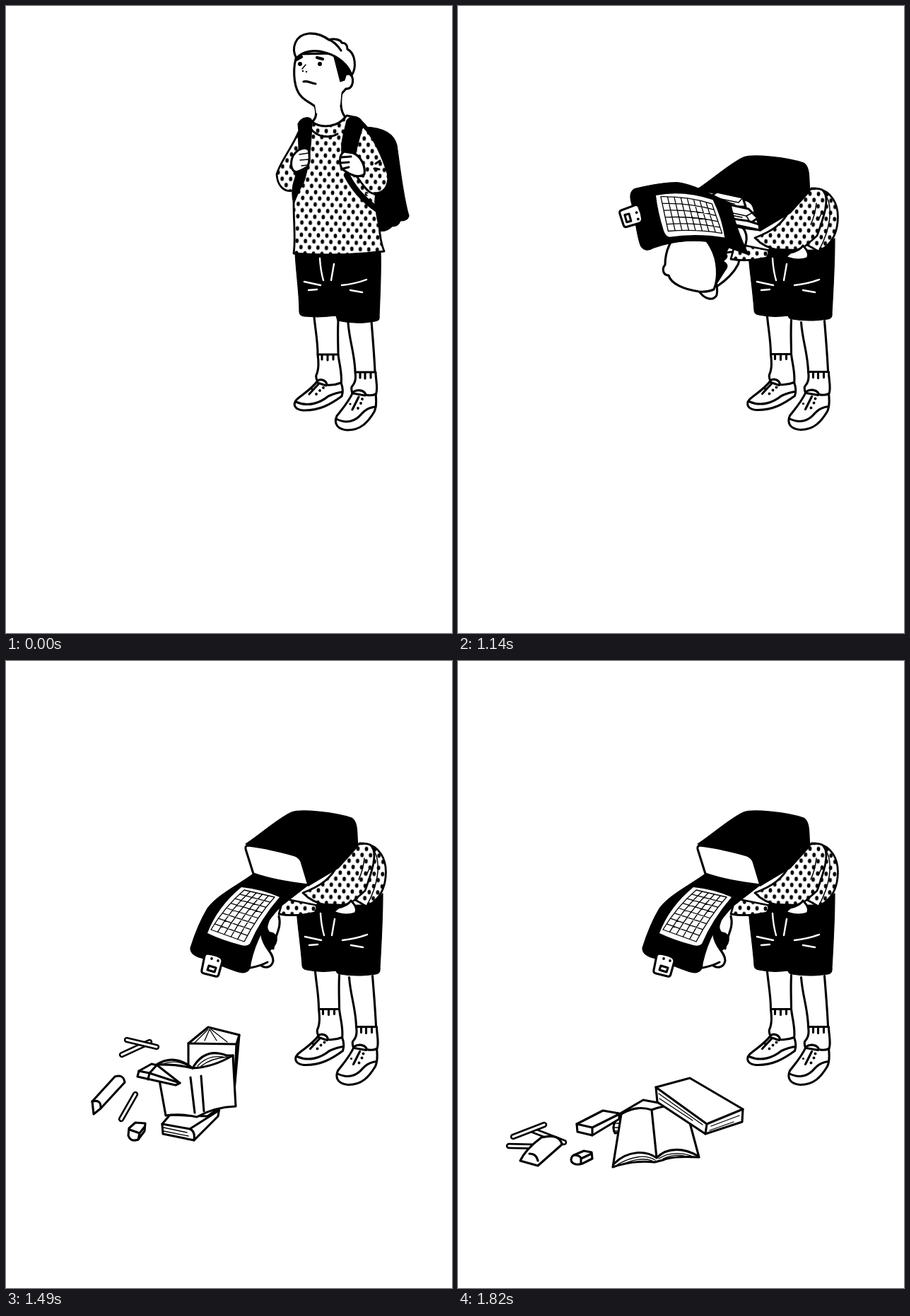
Animation of 631 by 887 pixels, one loop 3.82 s. Source, as an HTML page:

```html
<!DOCTYPE html>
<html lang="en">
<head>
<meta charset="utf-8">
<title>Emptied backpack</title>
<style>
html, body { margin: 0; width: 100%; height: 100%; overflow: hidden; background: #fff; }
svg { display: block; width: 100%; height: 100%; }
path { stroke: #000; stroke-width: 3.1; stroke-linecap: round; stroke-linejoin: round; fill: none; }
.w { fill: #fff; }
.k { fill: #000; stroke-width: 1.2; }
.s { fill: url(#dots); stroke-width: 2.8; }
.b { fill: #fff; stroke: none; }
.t { stroke-width: 1.5; }
.n { stroke-width: 1.3; }
.v { stroke: #fff; stroke-width: 2.4; }
.m { stroke-width: 4.2; }
.h { stroke-width: 8.5; }
.o { stroke-width: 8.4; }
.i { stroke: #fff; stroke-width: 3.2; }
</style>
</head>
<body>
<svg id="stage" viewBox="0 0 631 887" xmlns="http://www.w3.org/2000/svg"></svg>
<script>
const p = (cls, d) => `<path class="${cls}" d="${d}"/>`;
const dot = (x, y, r = 1.9) => `<circle cx="${x}" cy="${y}" r="${r}"/>`;
const group = (transform, body) => `<g transform="${transform}">${body}</g>`;
const pen = (x1, y1, x2, y2) => p('o', `M${x1},${y1}L${x2},${y2}`) + p('i', `M${x1},${y1}L${x2},${y2}`);
const item = (x, y, body) => ({ x, y, body });
const draw = items => items.map(i => i.body).join('');

// Items pulled towards a point (k = 1 leaves them in place) and turned by a.
const gather = (items, px, py, k, a) => items.map((it, n) =>
  group(`translate(${(1 - k) * (px - it.x)} ${(1 - k) * (py - it.y)}) rotate(${n % 2 ? a : -a} ${it.x} ${it.y})`, it.body)).join('');

const defs = `<defs><pattern id="dots" width="12" height="17.4" patternUnits="userSpaceOnUse" patternTransform="rotate(2)">
<rect width="12" height="17.4" fill="#fff"/><ellipse cx="3" cy="4.35" rx="2.4" ry="3.2"/><ellipse cx="9" cy="13.05" rx="2.4" ry="3.2"/>
</pattern></defs>`;

const legs =
  p('l', 'M436,440C438,460 441,475 441,492M470,445C469,465 470,480 470,492M484,448C486,475 493,490 494,517M517,446C519,470 521,495 522,517') +
  p('w', 'M441,493C443,508 442,516 439,522Q438,527 441,531L453,540L474,535C476,520 472,510 470,493Z') +
  p('l', 'M447,494V500M455,494V501M463,494V500') +
  p('w', 'M441,530C432,543 418,550 411,557C405,564 409,571 420,572C443,573 460,563 475,552Q478,543 474,533Q464,537 454,536C453,529 445,527 441,530Z') +
  p('l', 'M410,560C428,568 445,561 456,552Q467,547 476,546M441,533L453,537M429,549L442,535') +
  dot(439, 549) + dot(444, 544) + dot(449, 540) + dot(433, 542, 1.6) +
  p('w', 'M494,518C496,531 492,535 489,539Q488,544 491,550L505,554L523,550C527,542 523,530 523,518Z') +
  p('l', 'M501,519V526M508,519V527M516,519V526') +
  p('w', 'M491,546C485,560 475,571 468,580C463,592 470,599 483,600C502,600 512,589 521,574Q525,565 523,549Q517,552 509,550C507,543 497,542 491,546Z') +
  p('l', 'M467,584C482,592 495,587 503,577Q511,568 523,567M491,548L508,551M490,571L499,553') +
  dot(498, 569) + dot(502, 562) + dot(504, 556) + dot(487, 563, 1.6);
const movedLegs = group('translate(1.5 -.5)', legs);

const creases = p('v', 'M444,357Q445,374 449,388M464,365L460,388M475,395Q494,393 510,387M487,402L504,405M422,390L445,395M428,402L440,401');

const shorts =
  p('k', 'M409,347L530,347C531,380 529,410 528,439Q529,445 522,446Q495,451 469,445L467,438Q445,441 422,439Q415,438 415,432C415,405 410,375 409,347Z') + creases;

const bentShorts =
  p('k', 'M411,350L440,346L515,345L533,329C533,365 531,400 529,434Q530,442 523,443Q495,447 473,443Q468,443 467,438Q445,441 426,437Q419,436 419,430C417,400 413,380 411,350Z') +
  group('translate(1 0)', creases);

const standing = legs +
  p('k', 'M508,171C533,172 549,180 553,197C558,232 562,270 570,297Q568,304 558,304Q555,312 546,312Q538,320 528,318L508,270Z') +
  shorts +
  p('s', 'M424,166L434,163C448,173 470,171 482,155C501,157 512,171 515,181C520,230 520,280 528,310Q529,332 535,347Q472,355 407,350C410,330 407,310 407,278L416,230Z') +
  p('w', 'M436,138C440,150 440,158 433,164C447,174 470,171 480,157Q470,146 476,116Z') +
  p('l', 'M430,172C440,187 459,187 469,181') +
  p('s', 'M414,178C405,200 388,220 383,238C384,256 395,264 407,261L416,228Z') +
  p('k', 'M413,167C418,156 432,155 433,163C432,195 429,228 421,250Q414,262 407,280Q402,262 409,243C415,220 417,195 413,167Z') +
  p('w', 'M424,201Q413,201 406,212C401,224 404,234 411,235Q420,232 427,227Q431,216 428,203Z') +
  p('t', 'M415,210L428,208M416,218L428,217M418,226L427,225') +
  p('s', 'M503,168C520,184 534,215 541,240C541,260 531,266 518,265C509,262 504,250 495,240L494,208Z') +
  p('l', 'M523,223L529,219M521,230L528,231') +
  p('h', 'M482,239Q497,269 527,289') + p('b', 'M509,265L522,268L521,277Z') +
  p('k', 'M482,162C490,151 503,157 506,168C500,184 498,198 492,213L476,214C472,196 478,180 482,162Z') +
  p('w', 'M478,206C470,212 471,229 479,233C487,239 499,244 507,238C509,225 501,212 491,208Z') +
  p('l', 'M474,214L488,213M473,222L485,221M477,230L485,228') +
  p('w', 'M412,68C405,87 407,111 414,123C420,134 431,136 438,143L474,125L481,117C492,119 494,98 485,96L465,67Z') +
  p('b', 'M436,133L475,118L473,140L439,152Z') +
  p('k', 'M463,68L473,107L479,105L481,98L490,95Q482,73 463,68Z') +
  p('w', 'M411,74C403,60 409,41 428,39Q444,38 457,48C464,45 474,48 475,52Q483,52 483,61C495,67 496,88 489,98C484,83 470,71 452,66C436,61 419,64 411,74Z') +
  p('l', 'M456,47Q466,51 474,63') +
  dot(416, 82, 3) + dot(444, 82, 3) +
  p('m', 'M411,76L418,72M440,73L448,75') +
  p('t', 'M424,83L419,89') + dot(420, 92, 1.2) + dot(425, 93, 1.2) +
  p('l', 'M421,107C428,105 432,110 438,110');

const bending = movedLegs +
  p('k', 'M478,182C506,185 530,190 546,201C566,213 600,228 615,240Q617,248 603,247L556,245C561,262 567,273 566,284Q562,295 552,296Q548,313 534,313C520,308 504,290 487,272Z') +
  group('translate(1.5 0)', shorts) +
  p('s', 'M381,274C378,288 389,296 404,293L401,273Z') +
  p('s', 'M398,207L438,165Q458,167 480,185L518,278C533,300 527,325 536,346Q471,355 408,349C414,330 411,308 407,290C395,265 393,235 398,207Z') +
  p('k', 'M385,205L398,204Q393,220 393,248L382,248Z') +
  p('w', 'M379,249C374,263 380,275 392,276Q403,266 401,253Q393,240 384,243Z') +
  p('t', 'M383,257L394,248M383,265L397,257M387,272L398,265') +
  p('s', 'M480,182C505,190 536,220 549,245C551,265 534,278 509,278L482,267L487,250L467,235Z') +
  p('l', 'M512,236L521,230M513,244L526,236') +
  p('h', 'M473,263Q497,274 521,297') +
  p('k', 'M456,180C462,172 476,174 481,182Q467,205 467,237L450,235Q448,203 456,180Z') +
  p('w', 'M450,229C441,235 442,251 448,257Q464,264 482,263L487,248L468,236Q460,228 450,229Z') +
  p('w', 'M350,164C354,186 365,200 377,204Q387,207 398,200C420,206 440,197 442,178Q436,166 427,163C430,151 430,140 420,139Z') +
  p('l', 'M400,205C407,217 424,218 435,212') +
  p('k', 'M394,150L402,142L421,140L416,149L412,160Z') +
  p('l', 'M416,148Q417,157 421,161') +
  p('w', 'M343,137C339,114 357,98 386,97C388,90 399,92 400,99C416,104 425,121 422,141C407,142 397,149 385,155C370,164 350,166 338,163C329,157 332,144 343,137Z') +
  dot(382, 170, 2.8) + dot(356, 171, 2.2) +
  p('m', 'M374,162L382,161M351,167L356,168') +
  p('t', 'M366,179L367,186') + dot(371, 183, 1.2) + dot(372, 188, 1.2) +
  p('l', 'M373,194Q381,189 388,193');

const bentHead =
  p('w', 'M376,305C400,300 412,320 407,337Q404,347 395,352L370,350Z') +
  p('w', 'M380,349C394,345 401,355 396,366Q388,382 366,397L358,360Z') +
  p('k', 'M318,316C336,302 362,304 380,312C389,325 385,342 378,350Q385,354 375,361Q385,366 378,374L366,393L350,340Z') +
  p('w', 'M340,402C348,415 361,418 366,409Q368,400 364,388Z') +
  p('w', 'M318,316C300,328 293,348 293,366C288,372 290,381 298,381C301,393 320,401 341,404Q353,405 362,401C369,385 368,360 358,342C350,326 336,316 318,316Z');

const bent = movedLegs + bentShorts +
  p('s', 'M347,301C348,281 358,268 369,265L386,285L362,306Z') +
  p('s', 'M383,288L408,282L540,308C541,330 530,342 511,350L410,349C416,328 409,309 386,302Z') +
  bentHead +
  p('k', 'M378,130C379,114 394,112 410,116C432,123 452,123 463,130C472,140 470,170 468,201C491,198 520,205 536,213C545,218 542,228 542,237Q544,257 540,276L475,303L450,297C420,285 381,285 366,262C365,235 372,190 375,170Z') +
  p('w t', 'M459,245Q467,239 473,250V288Q465,295 457,288Q451,265 459,245Z') +
  p('t', 'M457,250L467,248M461,255L472,254M456,261L466,260M459,267H472M456,273L467,272M457,279L471,280M459,285L467,286') +
  p('s', 'M430,290Q457,303 478,290C496,279 504,266 524,266C546,271 546,304 533,325Q524,342 512,348L488,338L467,349Q443,343 430,314Z') +
  p('l', 'M529,285Q524,306 507,322M519,308L510,326') +
  p('h', 'M383,285L360,307M421,290C427,316 448,340 474,350') +
  p('w', 'M467,350Q474,362 490,362Q504,358 513,347L494,338Q487,347 467,350Z') +
  p('w', 'M414,106Q423,103 432,109Q434,121 430,133Q421,135 411,130Z') +
  p('t', 'M417,110L426,112Q428,116 425,117L416,115Q414,111 417,110Z') + dot(417, 126) + dot(427, 127);

// Mesh pocket: both long edges are curves, rows and columns run between them.
const quad = (a, b, c, t) => a * (1 - t) ** 2 + 2 * b * t * (1 - t) + c * t * t;
const mix = (a, b, t) => a + (b - a) * t;
const mesh = () => {
  let d = '';
  for (let c = 0; c <= 5; c++) {
    const u = c / 5;
    d += `M${mix(337, 380, u)},${mix(324, 334, u)}Q${mix(310, 355, u)},${mix(347, 362, u)} ${mix(290, 337, u)},${mix(380, 397, u)}`;
  }
  for (let r = 0; r <= 8; r++) {
    const t = r / 8;
    d += `M${quad(337, 310, 290, t)},${quad(324, 347, 380, t)}L${quad(380, 355, 337, t)},${quad(334, 362, 397, t)}`;
  }
  return p('n', d);
};

const flap =
  p('k', 'M350,301C332,315 300,330 285,350C273,370 266,390 261,406Q261,416 276,420C300,428 323,440 335,441Q346,440 346,428C353,395 369,366 390,346L426,318C400,316 370,309 350,301Z') +
  p('b', 'M333,320Q362,323 387,334Q360,365 345,400Q341,404 333,402Q306,395 285,385Q299,348 333,320Z') + mesh() +
  p('w', 'M285,414Q295,415 303,419Q306,421 306,425L301,443Q300,447 296,446L280,442Q276,441 277,437L281,417Q282,414 285,414Z') +
  p('l', 'M287,431L297,434L295,440L285,437Z') + dot(291, 421) + dot(300, 424);

const bagBody =
  p('k', 'M339,259C364,242 386,222 404,214C417,209 465,214 489,222C499,228 496,247 498,262L470,293L428,318C424,300 421,284 413,277Q375,266 339,259Z') +
  p('w', 'M343,261C362,263 393,270 409,275Q417,278 419,287L428,317Q382,312 350,301L339,266Q338,261 343,261Z');

const torso =
  p('s', 'M392,336L442,346L437,356Q408,362 386,358Z') +
  p('s', 'M500,258C528,257 542,281 536,313Q531,337 510,347L480,330Z') +
  p('s', 'M420,328C446,318 459,308 469,289C481,264 500,254 515,260C528,270 517,300 508,325L492,339Q480,348 456,346Q433,342 420,328Z') +
  p('t', 'M518,264C534,285 524,321 511,345M507,279Q505,297 499,309M515,291L510,303') +
  p('h', 'M442,347L473,348') +
  p('w', 'M463,355Q480,362 494,357Q499,350 488,339Q484,346 470,349Z');

const peek =
  p('b', 'M370,358L386,360L388,376L378,408L379,424Q376,434 362,432L346,434L340,400Z') +
  p('k', 'M374,361L360,384Q364,398 374,409Q385,400 383,390Q378,383 373,384Q369,380 370,374Z') +
  p('l', 'M386,361C391,378 379,390 378,407M362,388C364,406 378,411 378,424C376,434 367,435 361,431M346,434Q361,431 370,426');

const packed =
  p('w', 'M357,270L366,263L403,271L407,284L396,284L357,275Z') +
  p('t', 'M357,270L397,278L403,271M360,274L391,280') +
  p('w', 'M351,285L361,276L411,287L424,300L414,307L352,294Z') +
  p('t', 'M351,285L408,297L414,307M408,297L421,290M356,290L402,299') +
  p('w', 'M353,296L410,304L426,309L427,317L356,302Z');

const empty = movedLegs + bentShorts + torso + peek + bagBody + flap;
const full = empty + packed;
const swinging = movedLegs + bentShorts + bentHead + torso + bagBody + packed + group('rotate(58 388 322)', flap);

const airborne = [
  item(292, 563, p('w', 'M286,518L330,529L323,608L258,600V541Z') + p('l', 'M258,541L326,542L330,529M326,542L323,608') +
    p('n', 'M286,521L267,540M288,521L281,537M288,521L298,537M290,521L313,539')),
  item(262, 658, p('w', 'M221,655L232,642L285,644L302,632L300,644L266,678L222,669Z') +
    p('l', 'M221,655L260,662Q268,665 266,678M260,662L301,636') + p('n', 'M223,660L256,667M223,665L258,672')),
  item(270, 603, p('w', 'M213,571Q238,555 264,576Q281,546 312,558L321,558L325,630Q295,631 270,645Q247,640 226,643Z') +
    p('l', 'M213,571Q240,570 264,576Q292,575 321,558M261,589L267,639M276,587L280,637') +
    p('n', 'M222,570Q240,563 258,573M271,573Q285,557 307,560M276,573Q290,562 314,560')),
  item(216, 585, p('w', 'M186,588L188,580L206,570L214,572L246,597L240,600Z') + p('l', 'M188,580L203,583L213,572M203,583L201,592M203,583L246,597')),
  item(189, 545, pen(164, 557, 203, 539) + pen(171, 536, 213, 546)),
  item(145, 614, p('w', 'M122,623L154,588Q166,584 168,596L134,633L124,641Z') + p('l', 'M122,623Q134,620 134,631')),
  item(173, 631, pen(163, 648, 183, 613)),
  item(185, 665, p('w', 'M174,661L183,653L197,654L196,665L187,677Q176,681 173,671Z') + p('l', 'M175,663L189,668L196,659M189,668L187,677'))
];

const floorBooks = [
  item(258, 645, p('w', 'M228,641L262,621L300,628L290,660L222,668Q216,658 228,641Z') + p('n', 'M219,654H228M219,660H228M220,665H228')),
  item(280, 672, p('w', 'M231,641Q252,628 274,635Q296,626 322,631L341,702Q303,700 290,706L278,709Q247,706 219,716Z') +
    p('l', 'M274,635L281,703M221,711C240,692 266,692 281,703C297,686 322,690 339,700') +
    p('n', 'M226,712Q259,694 279,706M284,704Q304,691 333,701M235,711Q258,701 275,707M290,704Q308,696 324,701')),
  item(198, 654, p('w', 'M168,655L205,636L228,640V648L190,671L169,666Z') + p('l', 'M168,655L190,660L228,641M190,660V671'))
];

const landing = [
  ...floorBooks,
  item(355, 602, p('w', 'M292,577L332,551L409,571L412,645L405,652L313,609Z') + p('l', 'M292,577L377,600L409,571M377,600L405,651') +
    p('n', 'M305,573L330,579M312,568L352,578M318,564L345,571M323,558L362,568M360,583L382,589M372,573L398,580M383,595L396,618M389,591L399,612M394,586L404,626M400,581L405,606')),
  item(100, 636, pen(77, 633, 121, 654) + pen(100, 612, 105, 661)),
  item(92, 682, pen(73, 688, 112, 676)),
  item(113, 685, p('w', 'M84,699C93,690 108,683 117,670L131,662L144,665Q138,675 126,682Q115,694 103,704L87,706Z') + p('l', 'M97,692Q104,689 107,692')),
  item(174, 702, p('w', 'M164,698L178,691L188,692L190,700L174,711C166,714 159,711 159,705Q160,699 164,698Z') + p('l', 'M164,698Q173,698 174,703V711M174,703L189,694'))
];

const settled = [
  ...floorBooks,
  item(341, 630, p('w', 'M280,603L328,590L403,634L402,652L350,669L282,624Z') + p('l', 'M280,603L352,655L403,634M352,655L350,669') +
    p('n', 'M284,612L346,656M285,619L332,650M358,658L398,643M356,664L390,652')),
  item(114, 668, pen(106, 664, 150, 681) + pen(78, 673, 122, 656)),
  item(94, 687, pen(72, 686, 115, 687)),
  item(118, 692, p('w', 'M88,707C94,694 106,683 118,674Q144,668 147,684L113,714Z') + p('l', 'M101,697Q111,697 113,707')),
  item(175, 702, p('w', 'M164,699L178,693L189,695L190,704L176,711C167,714 160,711 160,705Q161,700 164,699Z') + p('l', 'M164,699Q173,699 174,704V711M174,704L189,697'))
];

const scenes = [
  [0, standing],
  [1000, bending],
  [1070, bent],
  [1140, swinging],
  [1210, full],
  [1280, empty + gather(airborne, 372, 310, .22, 28)],
  [1350, empty + gather(airborne, 330, 400, .45, 18)],
  [1420, empty + gather(airborne, 265, 500, .72, 9)],
  [1490, empty + draw(airborne)],
  [1560, empty + gather(landing, 235, 600, .75, 7)],
  [1630, empty + draw(landing)],
  [1750, empty + draw(floorBooks) + gather(settled.slice(3), 220, 640, .95, 5)],
  [1820, empty + draw(settled)]
];
const LOOP = 3820;

const stage = document.getElementById('stage');
stage.innerHTML = defs + scenes.map(s => `<g display="none">${s[1]}</g>`).join('');
const layers = [...stage.children].slice(1);
let shown = -1;

function render(ms) {
  const t = ms % LOOP;
  const now = scenes.filter(s => s[0] <= t).length - 1;
  if (now === shown) return;
  shown = now;
  layers.forEach((g, n) => g.setAttribute('display', n === now ? 'inline' : 'none'));
}

const start = performance.now();
function tick() {
  render(performance.now() - start);
  requestAnimationFrame(tick);
}
tick();
</script>
</body>
</html>
```
